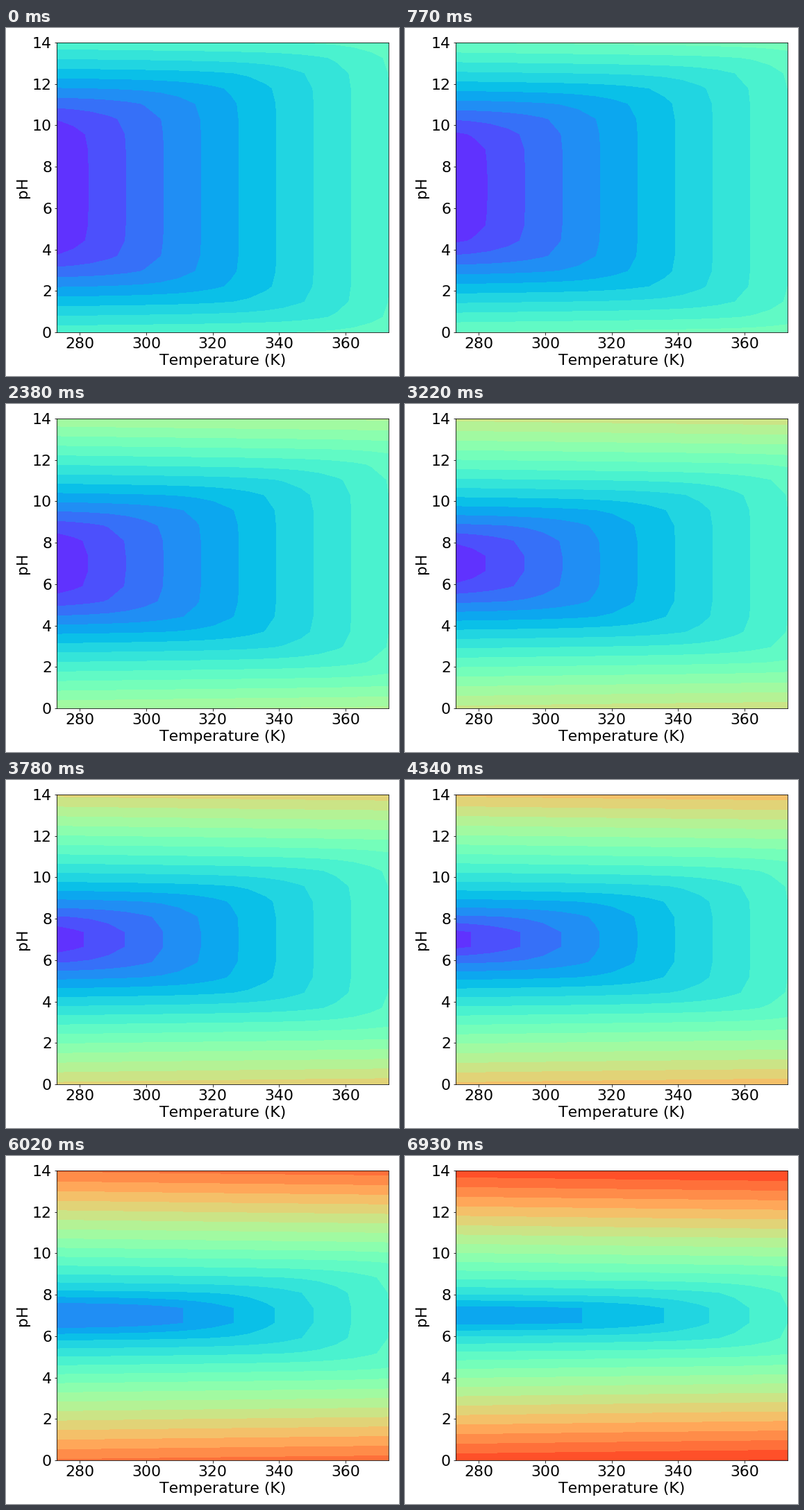
These frames come from a looping animation (566x502 px, 7000 ms). A matplotlib script:

```python
import matplotlib.pyplot as plt
import numpy as np
from matplotlib.animation import FuncAnimation

W, H, DPI = 566, 502, 72
FRAMES, INTERVAL = 100, 70
GRID = 20
LEVELS = np.arange(-1, 24)      # one level is half a decade

plt.rcParams.update({"font.family": "DejaVu Sans", "font.size": 22,
                     "text.kerning_factor": 6})

temp, ph = np.meshgrid(np.linspace(273, 373, GRID), np.linspace(0, 14, GRID))


def leak(x):
    """Log power for pumping ions across a gap of x pH units."""
    return np.log10(2 * x * np.sinh(x * np.log(10)))


thermal = 0.5 * (1 + (temp - 282.65) / 11.32)
gradient = 4 + leak(np.abs(ph - 7)) - leak(6.69) + 1.4 * np.log10(temp / 273)


def total_power(i):
    permeability = 6 * i / (FRAMES - 1)
    return 2 * np.log10(10 ** thermal + 10 ** (gradient + permeability))


fig = plt.figure(figsize=(W / DPI, H / DPI), dpi=DPI, facecolor="white")
left, right, top, bottom = 73, 551, 21, 439
ax = fig.add_axes([left / W, 1 - bottom / H, (right - left) / W, (bottom - top) / H])
ax.set_xlabel("Temperature (K)")
ax.set_ylabel("pH")
ax.set_xticks(range(280, 361, 20))
ax.set_yticks(range(0, 15, 2))

bands = []


def draw(i):
    while bands:
        bands.pop().remove()
    bands.append(ax.contourf(temp, ph, total_power(i), levels=LEVELS, cmap="rainbow"))
    ax.set_xlim(273, 373)
    ax.set_ylim(0, 14)
    return bands


anim = FuncAnimation(fig, draw, frames=FRAMES, init_func=lambda: draw(0),
                     interval=INTERVAL, repeat=True, repeat_delay=0)
plt.show()
```
